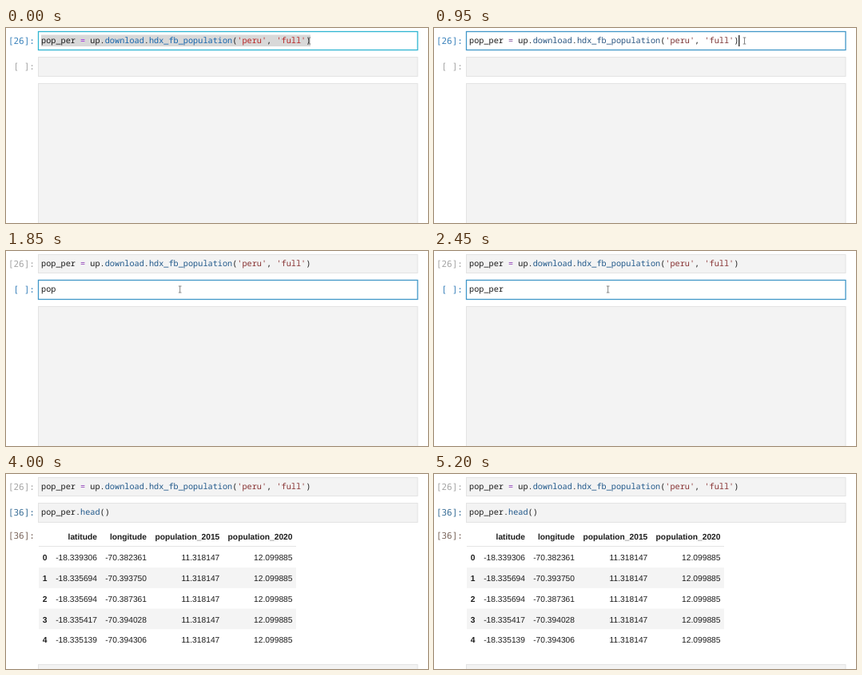
These frames come from a looping animation (528 by 244 pixels, 5250 ms). An HTML page:

```html
<!DOCTYPE html>
<html lang="en">
<head>
<meta charset="utf-8">
<style>
html, body { margin: 0; width: 528px; height: 244px; overflow: hidden; background: #fff; }
svg { display: block; }
text { white-space: pre; text-rendering: geometricPrecision; }
.code { font: 10.22px "Noto Sans Mono", "DejaVu Sans Mono", monospace; fill: #1c1c1c; }
.prompt { font: 11px "DejaVu Sans Mono", monospace; text-anchor: end; fill: #a6a6a6; }
.prompt.on { fill: #3f85bd; }
.prompt.ran { fill: #3d7199; }
.cell { fill: #f3f3f3; stroke: #e3e3e3; }
.cell.on { fill: #fff; stroke: #4197c8; stroke-width: 1.3; }
.prop { fill: var(--prop); }
.str { fill: var(--str); }
.op { fill: var(--op); }
#table { font: 10.25px "Liberation Sans", Arial, sans-serif; text-anchor: end; fill: #1c1c1c; }
.b { font-weight: bold; }
</style>
</head>
<body>
<svg id="stage" width="528" height="244">
  <rect class="cell" id="cell1" x="40.5" y="4.5" width="474.5" height="23"/>
  <rect class="cell" id="cell2" x="40.5" y="36.5" width="474.5" height="24"/>
  <rect class="cell" id="cell3" x="40.5" y="69.5" width="474.5" height="190"/>
  <rect id="selection" x="44" y="8.5" width="337" height="14.5" fill="#d8d8d8"/>
  <text class="prompt" id="prompt1" x="36" y="20">[26]:</text>
  <text class="prompt" id="prompt2" x="36" y="52"></text>
  <text class="code" x="44" y="19.3">pop_per <tspan class="op">=</tspan> up.<tspan class="prop">download</tspan>.<tspan class="prop">hdx_fb_population</tspan>(<tspan class="str">'peru'</tspan>, <tspan class="str">'full'</tspan>)</text>
  <text class="code" id="typed" x="44" y="51.3"></text>
  <g id="table">
    <text class="prompt" x="36" y="81" style="fill:#7c685e">[36]:</text>
    <path d="M41 90.5H363" stroke="#e4e4e4"/>
  </g>
  <rect id="caret" width="1.2" height="14" fill="#111"/>
  <path id="mouse" d="M-1.8-4H1.8M0-4V4M-1.8 4H1.8" fill="none" stroke="#858585"/>
</svg>
<script>
const $ = id => document.getElementById(id);
const LOOP = 5250, CLICK = 550, ENTER = 1400, RUN = 3650, CHAR = 6.13;

// Output table
const right = [51.5, 114, 176, 267.3, 358.5];
const rows = [
  ['', 'latitude', 'longitude', 'population_2015', 'population_2020'],
  ...[['339306', '382361'], ['335694', '393750'], ['335694', '387361'],
      ['335417', '394028'], ['335139', '394306']]
    .map(([lat, lon], i) => [i, '-18.' + lat, '-70.' + lon, '11.318147', '12.099885'])
];
$('table').innerHTML += rows.map((row, r) => {
  const y = r ? 108.4 + (r - 1) * 25.7 : 81.6;
  const stripe = r && r % 2 == 0
    ? `<rect x="41" y="${y - 17}" width="322" height="25.7" fill="#f4f4f4"/>` : '';
  return stripe + row.map((s, c) =>
    `<text x="${right[c]}" y="${y}"${r && c ? '' : ' class="b"'}>${s}</text>`).join('');
}).join('');

// Time of each keystroke and the text after it
const keys = [[1550, 'p'], [1700, 'po'], [1800, 'pop'], [2000, 'pop_'], [2100, 'pop_p'],
  [2200, 'pop_pe'], [2300, 'pop_per'], [2600, 'pop_per.'], [2750, 'pop_per.h'],
  [2850, 'pop_per.he'], [2950, 'pop_per.hea'], [3100, 'pop_per.head'], [3300, 'pop_per.head()']];

const show = (id, on) => $(id).style.display = on ? '' : 'none';
const ease = (t, from, to) => {
  const p = Math.min(1, Math.max(0, (t - from) / (to - from)));
  return p * p * (3 - 2 * p);
};
const setColors = (prop, str, op) => {
  const style = $('stage').style;
  style.setProperty('--prop', prop);
  style.setProperty('--str', str);
  style.setProperty('--op', op);
};

function draw(t) {
  const first = t < ENTER, done = t >= RUN;
  $('cell1').classList.toggle('on', first);
  $('cell1').style.stroke = t < CLICK ? '#2fb5d2' : '';
  $('prompt1').classList.toggle('on', first);
  $('cell2').classList.toggle('on', !first && !done);
  $('prompt2').classList.toggle('on', !first);
  $('prompt2').classList.toggle('ran', done);
  $('prompt2').textContent = done ? '[36]:' : '[ ]:';
  $('cell3').setAttribute('y', done ? 238.5 : 69.5);
  show('selection', t < CLICK);
  show('table', done);

  if (t < CLICK) setColors('#1464ac', '#b82525', '#a02be0');
  else if (first) setColors('#2a5580', '#7c3434', '#86559c');
  else setColors('#20588a', '#863030', '#9040b8');

  const text = keys.reduce((s, [at, now]) => t >= at ? now : s, '');
  $('typed').innerHTML = text.replace(/\.(\w+)/, '.<tspan class="prop">$1</tspan>');

  const end = first ? 55 : text.length - text.endsWith(')');
  $('caret').setAttribute('x', 44 + end * CHAR);
  $('caret').setAttribute('y', first ? 9 : 41);
  show('caret', !done && (first ? t >= CLICK && t < 1150 : t < 1550 || t >= 3300));

  const aside = ease(t, 150, 500), down = ease(t, 1100, 1350);
  const x = 379.5 + 9 * aside - 170.8 * down, y = 16 + 32 * down;
  $('mouse').setAttribute('transform', `translate(${x} ${y})`);
  show('mouse', !done);
}

const start = performance.now();
function frame() {
  draw((performance.now() - start) % LOOP);
  requestAnimationFrame(frame);
}
frame();
</script>
</body>
</html>
```
